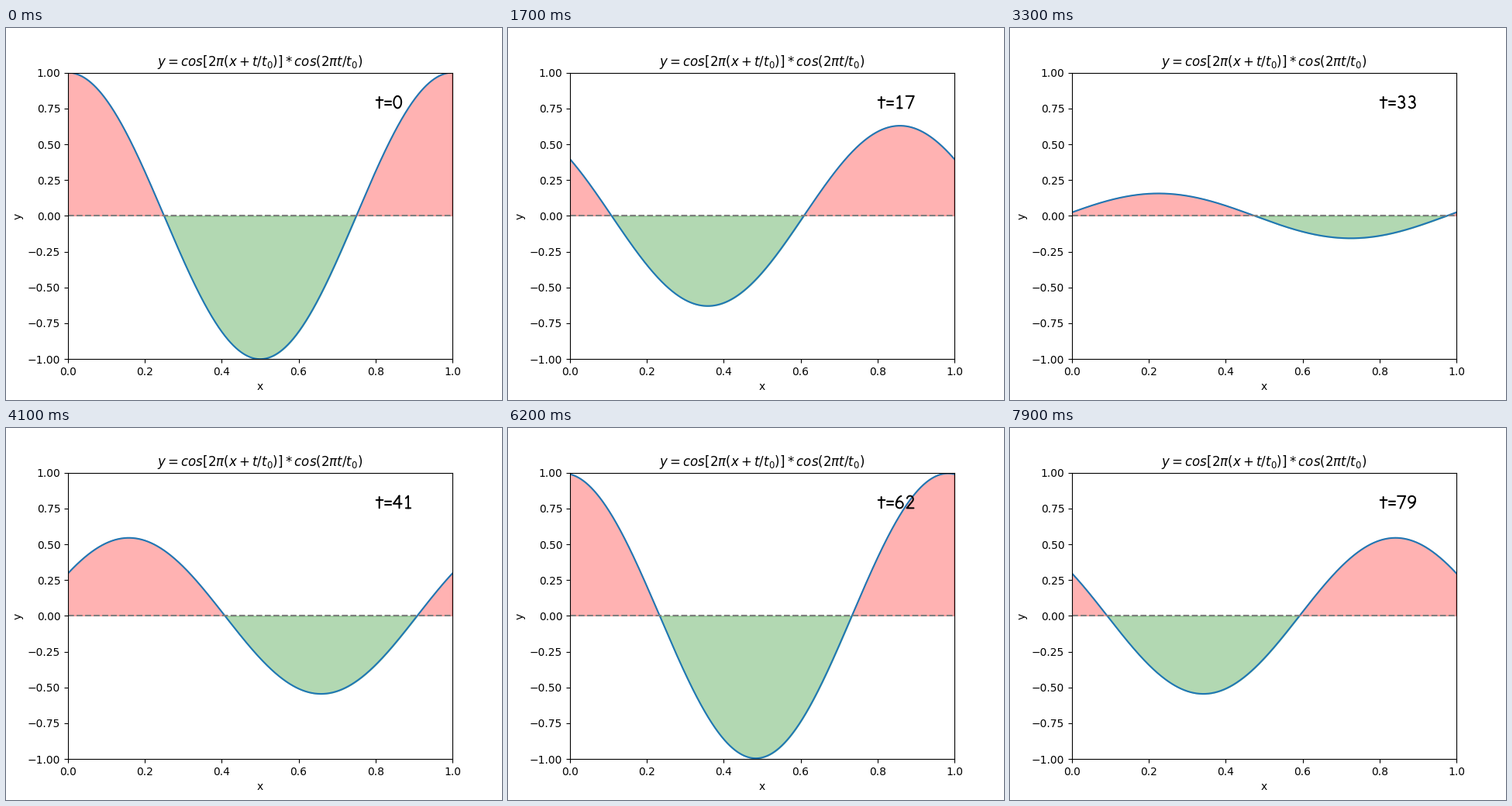
Recreate the animation shown at these times as a matplotlib script. Size 640 by 480 pixels, loop 8 s.

```python
import numpy as np
import matplotlib.pyplot as plt
from matplotlib.animation import FuncAnimation
from matplotlib.transforms import Affine2D, ScaledTranslation

FRAMES = 80
PERIOD = 120
FONT_SIZE = 16


def arc(cx, cy, rx, ry, start, end):
    a = np.radians(np.linspace(start, end, 40))
    return list(zip(cx + rx * np.cos(a), cy + ry * np.sin(a)))


# Handwritten glyphs: pen strokes in hundredths of an em.
GLYPHS = {
    "t": [[(22, 67), (22, 2)], [(4, 49), (43, 49)]],
    "=": [[(8, 41), (44, 41)], [(8, 21), (44, 21)]],
    "0": [arc(30, 37, 22, 35, 0, 360)],
    "1": [[(17, 59), (31, 73), (31, 2)], [(17, 2), (45, 2)]],
    "2": [arc(30, 54, 18, 19, 165, -40) + [(11, 2), (51, 2)]],
    "3": [arc(28, 55, 17, 17, 140, -90) + arc(28, 20, 20, 18, 90, -145)],
    "4": [[(40, 73), (6, 27), (54, 27)], [(40, 73), (40, 2)]],
    "5": [[(48, 73), (16, 73), (12, 40)] + arc(29, 24, 21, 22, 130, -145)],
    "6": [arc(50, 22, 40, 52, 105, 180) + arc(30, 22, 20, 20, 180, -180)],
    "7": [[(7, 72), (52, 72), (22, 1)]],
    "8": [arc(30, 55, 17, 17, 0, 360), arc(30, 20, 21, 18, 0, 360)],
    "9": [arc(29, 52, 20, 20, 0, 360) + arc(5, 52, 44, 51, 0, -75)],
}
ADVANCE = {"t": 47, "=": 51}


def write(text):
    """Return the pen path of the text, with gaps as NaN."""
    xs, ys, left = [], [], 0
    for ch in text:
        for stroke in GLYPHS[ch]:
            for px, py in stroke:
                xs.append(left + px)
                ys.append(py)
            xs.append(np.nan)
            ys.append(np.nan)
        left += ADVANCE.get(ch, 61)
    return xs, ys


fig, ax = plt.subplots(figsize=(6.4, 4.8), dpi=100)
ax.set(xlim=(0, 1), ylim=(-1, 1), xlabel="x", ylabel="y")
ax.set_title(r"$y=cos[2\pi(x+t/t_0)]*cos(2\pi t/t_0)$")

x = np.linspace(0, 1, 1001)
wave, = ax.plot(x, np.cos(2 * np.pi * x))
ax.axhline(0, color="gray", linestyle="--")

em = (Affine2D().scale(FONT_SIZE / 7200) + fig.dpi_scale_trans
      + ScaledTranslation(0.8, 0.75, ax.transData))
label, = ax.plot([], [], color="black", lw=1.45, transform=em, zorder=3,
                 solid_capstyle="round", solid_joinstyle="round")
fills = []


def update(t):
    phase = t / PERIOD
    y = np.cos(2 * np.pi * (x + phase)) * np.cos(2 * np.pi * phase)
    wave.set_ydata(y)
    while fills:
        fills.pop().remove()
    for where, color in ((y > 0, "red"), (y < 0, "green")):
        fills.append(ax.fill_between(x, 0, y, where=where,
                                     color=color, alpha=0.3))
    label.set_data(*write(f"t={t}"))
    return [wave, label, *fills]


anim = FuncAnimation(fig, update, frames=FRAMES, interval=100,
                     init_func=lambda: update(0), repeat=True, repeat_delay=0)
plt.show()
```
